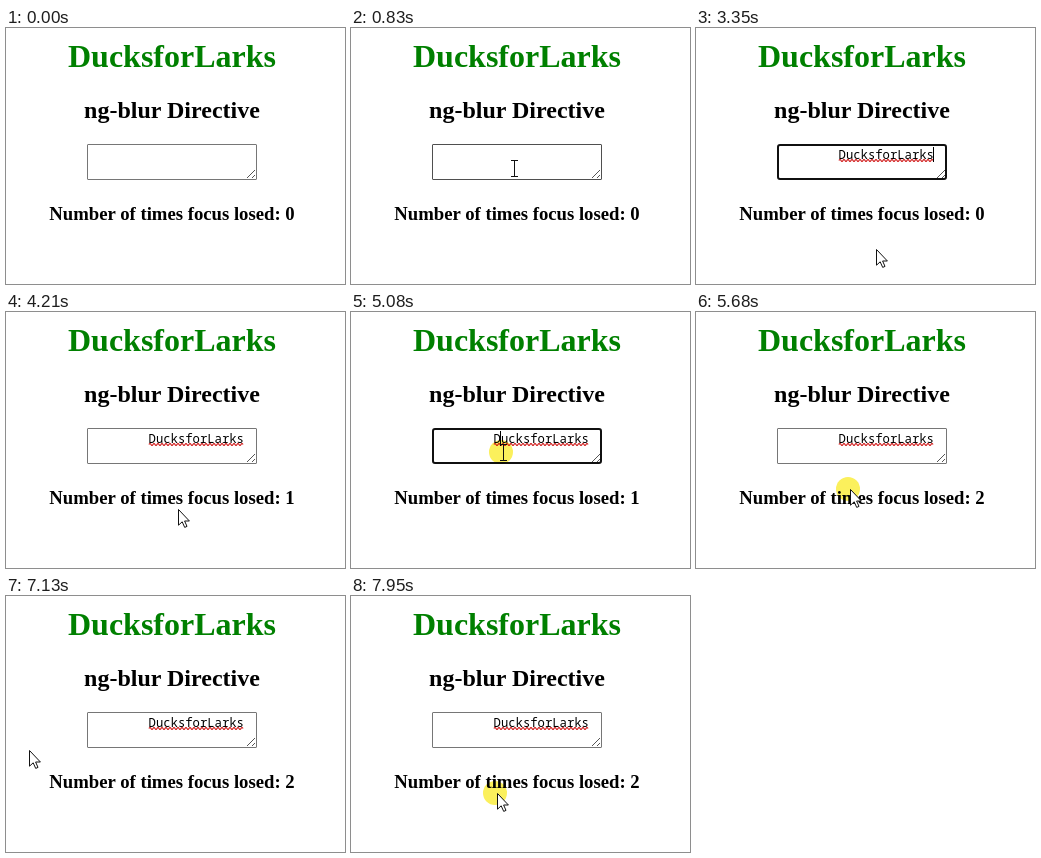
Write an HTML page that moves like this. It is 339 px wide and 256 px high and loops after 8 s.

```html
<!DOCTYPE html>
<html lang="en">
<head>
<meta charset="utf-8">
<title>ng-blur Directive</title>
<style>
  html, body { margin: 0; width: 100%; height: 100%; overflow: hidden; background: #fff; }
  svg { display: block; width: 339px; height: 256px; }
  .heading { font-family: "Liberation Serif", serif; font-weight: bold; text-anchor: middle; }
  .mono { font: 12.22px "Noto Sans Mono", monospace; }
</style>
</head>
<body>
<svg viewBox="0 0 339 256">
  <text class="heading" x="166" y="39" font-size="32" fill="#008000">DucksforLarks</text>
  <text class="heading" x="166" y="90" font-size="24">ng-blur Directive</text>
  <text class="heading" x="166" y="192" font-size="18.72" id="counter"></text>

  <rect id="box" fill="#fff"/>
  <path d="M241 150l8-8M246 150l3-3" stroke="#555" fill="none"/>
  <g id="typed">
    <text class="mono" x="142.6" y="131">DucksforLarks</text>
    <path id="squiggle" fill="none" stroke="#d01818" stroke-width="1.2"/>
  </g>
  <rect id="caret" y="119" width="1" height="15"/>

  <circle id="press" r="12" fill="#fbf05c" style="mix-blend-mode: multiply"/>
  <path id="arrow" d="M.5.5V16.2L4.2 12.8 6.7 18.4 9 17.4 6.6 12H11.4Z" fill="#fff" stroke="#111"/>
  <path id="beam" d="M-3 -7.5H4M.5 -7V8M-3 8.5H4" fill="none" stroke="#111"/>
</svg>
<script>
const LOOP = 8000, ENTER = 70, PASTE = 2310;
const BLINK = 515, PRESS = 110;
const TEXT_LEFT = 142, TEXT_RIGHT = 237;
const clicks = [1040, 3480, 5080, 5680, 7950];

// The pointer rests between these eased moves.
const entry = { x: 268, y: 250 };
const moves = [
  { from: ENTER, to: 830, x: 163, y: 140 },
  { from: 2500, to: 3200, x: 180, y: 221 },
  { from: 3870, to: 4820, x: 152, y: 140 },
  { from: 5200, to: 5600, x: 154, y: 177 },
  { from: 6060, to: 6240, x: 154, y: 150 },
  { from: 6240, to: 6920, x: 48, y: 173 },
  { from: 6920, to: 7200, x: 18, y: 150 },
  { from: 7200, to: 7740, x: 118, y: 174 },
  { from: 7740, to: 7900, x: 146, y: 197 }
];

const el = id => document.getElementById(id);
const show = (id, on) => el(id).setAttribute("visibility", on ? "visible" : "hidden");
const clamp = (v, low, high) => Math.min(high, Math.max(low, v));
const ease = k => k * k * (3 - 2 * k);

function setAttrs(id, attrs) {
  for (const name in attrs) el(id).setAttribute(name, attrs[name]);
}

function pointerAt(t) {
  let { x, y } = entry;
  for (const move of moves) {
    const k = ease(clamp((t - move.from) / (move.to - move.from), 0, 1));
    x += (move.x - x) * k;
    y += (move.y - y) * k;
  }
  return { x: Math.round(x), y: Math.round(y) };
}

const inBox = ({ x, y }) => x >= 81 && x < 251 && y >= 116 && y < 152;

function drawBox(focused, hovered) {
  const line = focused ? 2 : 1;
  setAttrs("box", {
    x: 81 + line / 2, y: 116 + line / 2, width: 170 - line, height: 36 - line,
    rx: focused ? 2 : 0.5, "stroke-width": line,
    stroke: focused ? "#101010" : hovered ? "#4f4f4f" : "#767676"
  });
}

function drawCaret(t, focusTime, focused, clickX) {
  const typed = t >= PASTE;
  const justPasted = typed && focusTime < PASTE;
  const elapsed = t - (justPasted ? PASTE : focusTime);
  const x = justPasted ? TEXT_RIGHT : typed ? clickX : TEXT_LEFT;
  show("caret", focused && Math.floor(elapsed / BLINK) % 2 === 0);
  el("caret").setAttribute("x", x);
}

function render(t) {
  const pointer = pointerAt(t);
  const hovered = inBox(pointer);

  // A click inside the box focuses it; the next one outside blurs it.
  const past = clicks.filter(time => time <= t);
  const hits = past.map(time => inBox(pointerAt(time)));
  const lastClick = past.at(-1) ?? -LOOP;
  const focused = hits.at(-1) ?? false;
  const losses = hits.filter((hit, i) => !hit && hits[i - 1]).length;
  const spot = pointerAt(lastClick);

  drawBox(focused, hovered);
  drawCaret(t, lastClick, focused, spot.x - 3);
  el("counter").textContent = "Number of times focus losed: " + losses;
  show("typed", t >= PASTE);

  show("press", t - lastClick < PRESS);
  setAttrs("press", { cx: spot.x - 2, cy: spot.y });

  show("arrow", t >= ENTER && !hovered);
  show("beam", hovered);
  for (const id of ["arrow", "beam"]) {
    el(id).setAttribute("transform", `translate(${pointer.x} ${pointer.y})`);
  }
}

el("squiggle").setAttribute("d", "M143 132.5q1-2 2 0" + "t2 0".repeat(46));

const start = performance.now();
function tick() {
  render((performance.now() - start) % LOOP);
  requestAnimationFrame(tick);
}
tick();
</script>
</body>
</html>
```
